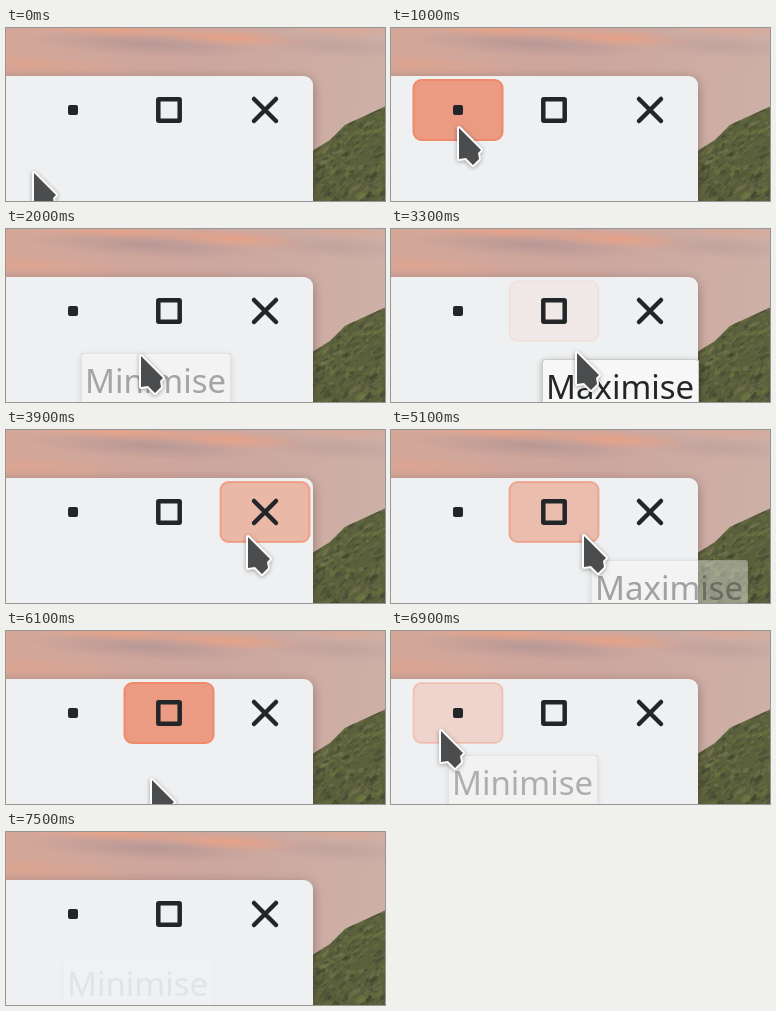
Write an HTML page with a canvas that moves like this. It is 379x173 px and loops after 7600 ms.

```html
<!DOCTYPE html>
<html lang="en">
<head>
<meta charset="utf-8">
<title>Window buttons</title>
<style>
  html, body { margin: 0; width: 100%; height: 100%; overflow: hidden; }
  canvas { display: block; }
</style>
</head>
<body>
<canvas id="stage" width="379" height="173"></canvas>
<script>
const W = 379, H = 173, LOOP = 7600, STEP = 100, FADE = 300;
const ctx = document.getElementById('stage').getContext('2d');
const INK = '#232629';

const buttons = {
  Minimise: { x: 67, icon: drawMinimise },
  Maximise: { x: 163, icon: drawMaximise },
  Close: { x: 259, icon: drawClose }
};

// The pointer enters and leaves a button; its tooltip shows and hides
const visits = [
  { name: 'Minimise', enter: 500, leave: 1600, show: 1200, hide: 1815, x: 75, y: 124 },
  { name: 'Maximise', enter: 2050, leave: 3030, show: 2100, hide: 3500, x: 151, y: 130 },
  { name: 'Close', enter: 3700, leave: 4260, show: 3900, hide: 4600, x: 249, y: 131 },
  { name: 'Maximise', enter: 4920, leave: 6100, show: 4980, hide: 5600, x: 200, y: 130 },
  { name: 'Minimise', enter: 6800, leave: 7200, show: 6800, hide: 7220, x: 57, y: 124 }
];

// Resting and turning points of the pointer
const stops = [
  { t: 200, x: 27, y: 143 }, { t: 1000, x: 67, y: 98 },
  { t: 1500, x: 67, y: 98 }, { t: 2000, x: 134, y: 125 },
  { t: 2300, x: 143, y: 104 }, { t: 2800, x: 143, y: 104 },
  { t: 3300, x: 185, y: 122 }, { t: 3900, x: 241, y: 105 },
  { t: 4500, x: 233, y: 127 }, { t: 5100, x: 192, y: 104 },
  { t: 5900, x: 150, y: 104 }, { t: 6100, x: 145, y: 147 },
  { t: 6900, x: 49, y: 98 }, { t: 7200, x: 49, y: 98 }, { t: 7400, x: 44, y: 185 }
];

const clamp = v => Math.max(0, Math.min(1, v));
const smooth = v => v * v * (3 - 2 * v);
const fade = (t, from, to) => clamp((t - from) / FADE) * (1 - clamp((t - to) / FADE));

function pointerAt(t) {
  const next = stops.findIndex(stop => stop.t > t);
  if (next === 0) return stops[0];
  if (next < 0) return stops[stops.length - 1];
  const a = stops[next - 1], b = stops[next];
  const k = smooth((t - a.t) / (b.t - a.t));
  return { x: a.x + (b.x - a.x) * k, y: a.y + (b.y - a.y) * k };
}

function randomizer(seed) {
  return (low, high) => {
    seed = seed * 16807 % 2147483647;
    return low + (high - low) * seed / 2147483647;
  };
}

function polygon(c, points) {
  c.beginPath();
  points.forEach(p => c.lineTo(...p));
  c.closePath();
}

function box(c, x, y, w, h, r) {
  c.beginPath();
  c.roundRect(x, y, w, h, r);
}

function setShadow(c, color, blur, dy) {
  c.shadowColor = color;
  c.shadowBlur = blur;
  c.shadowOffsetY = dy;
}

function cloud(c, x, y, rx, ry, rgb, alpha) {
  c.save();
  c.translate(x, y);
  c.rotate(.05);
  c.scale(rx, ry);
  const g = c.createRadialGradient(0, 0, 0, 0, 0, 1);
  g.addColorStop(0, `rgba(${rgb},${alpha})`);
  g.addColorStop(1, `rgba(${rgb},0)`);
  c.fillStyle = g;
  c.fillRect(-1, -1, 2, 2);
  c.restore();
}

function drawSky(c) {
  const g = c.createLinearGradient(0, 20, W, 90);
  g.addColorStop(0, '#d4a799');
  g.addColorStop(.5, '#cda69d');
  g.addColorStop(1, '#cdb0a7');
  c.fillStyle = g;
  c.fillRect(0, 0, W, H);
  const mauve = '165,140,143', peach = '240,160,128';
  cloud(c, 140, 16, 120, 13, mauve, .55);
  cloud(c, 330, 18, 90, 12, mauve, .3);
  cloud(c, 110, 2, 100, 8, peach, .65);
  cloud(c, 225, 10, 75, 9, peach, .75);
  cloud(c, 20, 36, 110, 10, peach, .35);
  cloud(c, 340, 2, 60, 8, peach, .35);
}

function drawMountain(c) {
  const random = randomizer(9);
  c.save();
  polygon(c, [[300, 129], [308, 122], [324, 112], [339, 97], [354, 90], [380, 78], [380, 174], [300, 174]]);
  c.fillStyle = '#5a603c';
  c.fill();
  c.clip();
  // Slanted tufts of grass, broken by shaded rock
  const shades = ['#727b40', '#353b2c', '#69703f', '#4a5036', '#7c7756'];
  for (let i = 0; i < 420; i++) {
    c.fillStyle = shades[i % shades.length];
    c.globalAlpha = random(.25, .6);
    c.beginPath();
    c.ellipse(random(302, 382), random(78, 176), random(1, 6), random(.6, 2.2), random(-1.1, -.3), 0, 7);
    c.fill();
  }
  c.restore();
}

function drawBackdrop() {
  const canvas = document.createElement('canvas');
  canvas.width = W;
  canvas.height = H;
  const c = canvas.getContext('2d');
  drawSky(c);
  drawMountain(c);
  setShadow(c, 'rgba(60,35,35,.4)', 12, 3);
  c.fillStyle = '#eff0f1';
  box(c, -40, 48, 347, 200, 9);
  c.fill();
  return canvas;
}

function drawMinimise() {
  box(ctx, -5, -5, 10, 10, 2);
  ctx.fill();
}

function drawMaximise() {
  box(ctx, -10.7, -10.7, 21.4, 21.4, .5);
  ctx.stroke();
}

function drawClose() {
  ctx.beginPath();
  for (const side of [-1, 1]) {
    ctx.moveTo(-11 * side, -11);
    ctx.lineTo(11 * side, 11);
  }
  ctx.stroke();
}

function drawButton([name, { x, icon }], t) {
  const glow = Math.max(...visits.map(v => v.name === name ? fade(t, v.enter, v.leave) : 0));
  ctx.save();
  ctx.translate(x, 82);
  ctx.globalAlpha = glow;
  box(ctx, -44.5, -30, 89, 60, 8);
  ctx.fillStyle = '#ea9b82';
  ctx.fill();
  ctx.strokeStyle = '#f08a6b';
  ctx.lineWidth = 2;
  ctx.stroke();
  ctx.globalAlpha = 1;
  ctx.fillStyle = ctx.strokeStyle = INK;
  ctx.lineWidth = 4.5;
  ctx.lineCap = 'round';
  icon();
  ctx.restore();
}

function drawTip({ name, x, y, show, hide }, t) {
  const alpha = fade(t, show, hide);
  if (alpha === 0) return;
  ctx.save();
  ctx.globalAlpha = alpha;
  ctx.font = '33px "Noto Sans", sans-serif';
  const width = Math.round(ctx.measureText(name).width + 9);

  // Keep the shadow outside so that it never darkens a translucent tip
  ctx.save();
  ctx.beginPath();
  ctx.rect(0, 0, W, H);
  ctx.roundRect(x, y, width, 60, 3);
  ctx.clip('evenodd');
  setShadow(ctx, 'rgba(0,0,0,.3)', 6, 2);
  box(ctx, x, y, width, 60, 3);
  ctx.fill();
  ctx.restore();

  ctx.fillStyle = '#f7f7f7';
  box(ctx, x, y, width, 60, 3);
  ctx.fill();
  ctx.strokeStyle = 'rgba(35,38,41,.2)';
  box(ctx, x + .5, y + .5, width - 1, 59, 3);
  ctx.stroke();
  ctx.fillStyle = INK;
  ctx.fillText(name, x + 4, y + 40);
  ctx.restore();
}

function drawPointer(t) {
  const { x, y } = pointerAt(t);
  ctx.save();
  ctx.translate(x, y);
  polygon(ctx, [[1, 2], [1, 33], [8, 32], [15, 39], [21, 33], [20, 27], [23, 24]]);
  ctx.lineJoin = 'round';
  ctx.lineWidth = 4;
  ctx.strokeStyle = '#fcfcfc';
  setShadow(ctx, 'rgba(0,0,0,.35)', 4, 1);
  ctx.stroke();
  ctx.shadowColor = 'transparent';
  ctx.fillStyle = '#4b4c4d';
  ctx.fill();
  ctx.restore();
}

const backdrop = drawBackdrop();

function render(now) {
  const t = Math.floor(now % LOOP / STEP) * STEP;
  ctx.drawImage(backdrop, 0, 0);
  Object.entries(buttons).forEach(button => drawButton(button, t));
  visits.forEach(visit => drawTip(visit, t));
  drawPointer(t);
}

const start = performance.now();
function tick() {
  render(performance.now() - start);
  requestAnimationFrame(tick);
}
tick();
</script>
</body>
</html>
```
